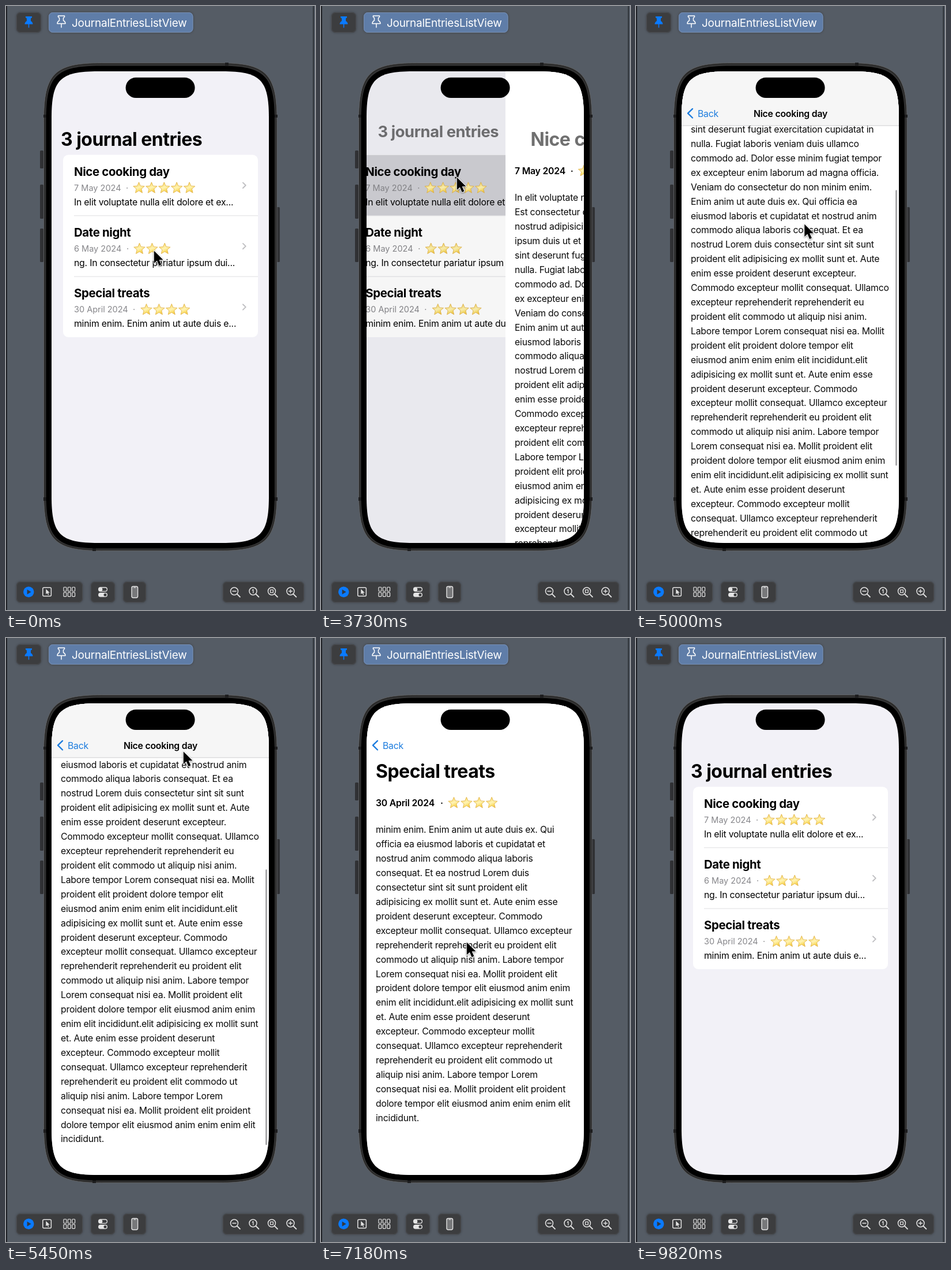
Write an HTML page with a canvas that moves like this. It is 536 px wide and 1045 px high and loops after 9910 ms.

```html
<!DOCTYPE html>
<html lang="en">
<head>
<meta charset="utf-8">
<title>Journal preview</title>
<style>
html, body { margin: 0; width: 100%; height: 100%; overflow: hidden; background: #555c65; }
canvas { display: block; width: 536px; height: 1045px; }
</style>
</head>
<body>
<canvas id="stage"></canvas>
<script>
const W = 536, H = 1045, LOOP = 9910, FPS = 11;
const canvas = document.getElementById('stage');
const ctx = canvas.getContext('2d');
const dpr = window.devicePixelRatio || 1;
canvas.width = W * dpr;
canvas.height = H * dpr;

// weight, size, tracking
const BODY = [400, 15.8, -0.22], BOLD = [600, 15.8, -0.22], SMALL = [400, 14.5, 0];
const LARGE = [700, 32, -0.52], HEAD = [700, 20.4, -0.36], BAR = [400, 19, -0.24];
const SCREEN = { x: 79, y: 113, w: 377, h: 816 };
const BAR_END = 207, LINE = 24.92, MAX_SCROLL = 362;
const BLUE = '#1c7cde';

const longText = [
  'In elit voluptate nulla elit dolore et exercitation.',
  'Est consectetur do tempor sunt veniam',
  'nostrud adipisicing. In consectetur pariatur',
  'ipsum duis ut et pariatur. Fugiat incididunt et',
  'sint deserunt fugiat exercitation cupidatat in',
  'nulla. Fugiat laboris veniam duis ullamco',
  'commodo ad. Dolor esse minim fugiat tempor',
  'ex excepteur enim laborum ad magna officia.',
  'Veniam do consectetur do non minim enim.',
  'Enim anim ut aute duis ex. Qui officia ea',
  'eiusmod laboris et cupidatat et nostrud anim',
  'commodo aliqua laboris consequat. Et ea',
  'nostrud Lorem duis consectetur sint sit sunt',
  'proident elit adipisicing ex mollit sunt et. Aute',
  'enim esse proident deserunt excepteur.',
  'Commodo excepteur mollit consequat. Ullamco',
  'excepteur reprehenderit reprehenderit eu',
  'proident elit commodo ut aliquip nisi anim.',
  'Labore tempor Lorem consequat nisi ea. Mollit',
  'proident elit proident dolore tempor elit',
  'eiusmod anim enim enim elit incididunt.elit',
  'adipisicing ex mollit sunt et. Aute enim esse',
  'proident deserunt excepteur. Commodo',
  'excepteur mollit consequat. Ullamco excepteur',
  'reprehenderit reprehenderit eu proident elit',
  'commodo ut aliquip nisi anim. Labore tempor',
  'Lorem consequat nisi ea. Mollit proident elit',
  'proident dolore tempor elit eiusmod anim enim',
  'enim elit incididunt.elit adipisicing ex mollit sunt',
  'et. Aute enim esse proident deserunt',
  'excepteur. Commodo excepteur mollit',
  'consequat. Ullamco excepteur reprehenderit',
  'reprehenderit eu proident elit commodo ut',
  'aliquip nisi anim. Labore tempor Lorem',
  'consequat nisi ea. Mollit proident elit proident',
  'dolore tempor elit eiusmod anim enim enim elit',
  'incididunt.'
];
const entries = [
  { title: 'Nice cooking day', date: '7 May 2024', stars: 5, left: 95,
    rowDot: 210, rowStar: 230.5, dot: 194, star: 215,
    teaser: 'In elit voluptate nulla elit dolore et ex...', lines: longText },
  { title: 'Date night', date: '6 May 2024', stars: 3, left: 100,
    rowDot: 211, rowStar: 231.5, dot: 200, star: 221,
    teaser: 'ng. In consectetur pariatur ipsum dui...',
    lines: [
      'ng. In consectetur pariatur ipsum duis ut et pt',
      'elit commodo ut aliquip nisi anim. Labore',
      'tempor Lorem consequat nisi ea. Mollit',
      'proident elit proident dolore tempor elit',
      'eiusmod anim enim enim elit incididunt.'
    ] },
  { title: 'Special treats', date: '30 April 2024', stars: 4, left: 95,
    rowDot: 222, rowStar: 243.5, dot: 209.5, star: 230.5,
    teaser: 'minim enim. Enim anim ut aute duis e...',
    lines: [
      'minim enim. Enim anim ut aute duis ex. Qui',
      'officia ea eiusmod laboris et cupidatat et',
      'nostrud anim commodo aliqua laboris',
      'consequat. Et ea nostrud Lorem duis',
      'consectetur sint sit sunt proident elit',
      ...longText.slice(21)
    ] }
];

// Which entry opens and closes when
const visits = [
  { entry: 1, open: 1660, close: 2690 },
  { entry: 0, open: 3660, close: 5930 },
  { entry: 2, open: 6660, close: 7760 }
];
// time, x, y of the pointer tip
const pointer = [
  [0, 256, 422], [90, 256, 422], [180, 153, 290], [640, 153, 290], [1090, 318, 422],
  [1760, 318, 422], [2090, 322, 403], [2200, 322, 403], [2560, 112, 172], [2960, 112, 172],
  [3480, 235, 295], [3880, 235, 295], [4260, 276, 601], [4450, 276, 600], [4640, 276, 557],
  [5360, 307, 195], [5540, 307, 195], [5850, 112, 182], [6100, 112, 182], [6500, 252, 525],
  [7270, 252, 525], [7630, 123, 186], [8910, 123, 186], [9270, 43, 230]
];

const clamp = (v, a = 0, b = 1) => Math.min(b, Math.max(a, v));
const mix = (a, b, u) => a + (b - a) * u;

function spring(ms) {
  const k = Math.max(0, ms) * 0.0188;
  const p = 1 - (1 + k) * Math.exp(-k);
  return p > 0.992 ? 1 : p;
}

function pointerAt(t) {
  const i = pointer.findIndex(k => k[0] > t);
  if (i < 0) return null;
  const [t0, x0, y0] = pointer[i - 1], [t1, x1, y1] = pointer[i];
  let u = (t - t0) / (t1 - t0);
  u = u * u * (3 - 2 * u);
  return { x: mix(x0, x1, u), y: mix(y0, y1, u) };
}

function text(str, x, y, [weight, size, track], color, align = 'left') {
  ctx.font = `${weight} ${size}px Inter, "Liberation Sans", sans-serif`;
  ctx.letterSpacing = track + 'px';
  ctx.textAlign = align;
  ctx.fillStyle = color;
  ctx.fillText(str, x, y);
}

function rect(x, y, w, h, color) {
  ctx.fillStyle = color;
  ctx.fillRect(x, y, w, h);
}

function paint(shape, fill, stroke, width = 1) {
  if (fill) { ctx.fillStyle = fill; ctx.fill(shape); }
  if (stroke) { ctx.strokeStyle = stroke; ctx.lineWidth = width; ctx.stroke(shape); }
}

function rounded(x, y, w, h, r) {
  const shape = new Path2D();
  shape.roundRect(x, y, w, h, r);
  return shape;
}

// Rounded rectangle whose corners ease into the straight sides
function smooth(x, y, w, h, r) {
  const shape = new Path2D(), e = r * 1.528, c = r * 0.272, X = x + w, Y = y + h;
  shape.moveTo(x + e, y);
  shape.lineTo(X - e, y);
  shape.bezierCurveTo(X - c, y, X, y + c, X, y + e);
  shape.lineTo(X, Y - e);
  shape.bezierCurveTo(X, Y - c, X - c, Y, X - e, Y);
  shape.lineTo(x + e, Y);
  shape.bezierCurveTo(x + c, Y, x, Y - c, x, Y - e);
  shape.lineTo(x, y + e);
  shape.bezierCurveTo(x, y + c, x + c, y, x + e, y);
  shape.closePath();
  return shape;
}

function round(x, y, w, h, r, ...style) {
  paint(rounded(x, y, w, h, r), ...style);
}

function circle(x, y, r, ...style) {
  round(x - r, y - r, 2 * r, 2 * r, r, ...style);
}

function path(d, x, y, ...style) {
  at(x, y, () => {
    ctx.lineCap = ctx.lineJoin = 'round';
    paint(new Path2D(d), ...style);
  });
}

function at(x, y, draw) {
  ctx.save();
  ctx.translate(x, y);
  draw();
  ctx.restore();
}

function faded(alpha, draw) {
  if (alpha <= 0) return;
  ctx.save();
  ctx.globalAlpha = clamp(alpha);
  draw();
  ctx.restore();
}

function clipped(shape, draw) {
  ctx.save();
  ctx.clip(shape);
  draw();
  ctx.restore();
}

function stars(n, x, y) {
  for (let s = 0; s < n; s++) at(x + s * 21.9, y, () => {
    const g = ctx.createLinearGradient(-4, -10, 4, 9);
    g.addColorStop(0, '#f8d65a');
    g.addColorStop(0.5, '#fff3b4');
    g.addColorStop(0.75, '#fbde68');
    g.addColorStop(1, '#f0bc3a');
    ctx.beginPath();
    for (let i = 0; i < 10; i++) {
      const r = i % 2 ? 4.6 : 10.2, a = i * Math.PI / 5 - Math.PI / 2;
      ctx.lineTo(r * Math.cos(a), r * Math.sin(a) + 0.5);
    }
    ctx.closePath();
    ctx.lineJoin = 'round';
    ctx.fillStyle = g;
    ctx.fill();
    ctx.strokeStyle = '#e2b54c';
    ctx.lineWidth = 0.9;
    ctx.stroke();
  });
}

function listPage(selected, glow) {
  rect(-60, 113, 640, 816, '#f2f1f7');
  clipped(rounded(99, 257.5, 338, 315.5, 9), () => {
    rect(99, 257, 338, 317, '#fff');
    entries.forEach((e, i) => {
      const y = i * 105.3;
      if (i === selected) faded(glow, () => rect(99, 257.5 + y, 338, 105, '#d0d0d5'));
      if (i) rect(118, 257 + y, 319, 1, '#dedee1');
      text(e.title, 118, 293.5 + y, HEAD, '#000');
      text(e.date, 118, 319.5 + y, SMALL, '#86868a');
      text('·', e.rowDot, 319.5 + y, SMALL, '#86868a', 'center');
      stars(e.stars, e.rowStar, 314.5 + y);
      text(e.teaser, 118, 344.8 + y, BODY, '#000');
      path('M0-4.7L4.8 0L0 4.7', 411, 310.3 + y, null, '#bfbfc2', 1.9);
    });
  });
}

function detailPage(e, scroll) {
  rect(79, 113, 377, 816, '#fff');
  at(0, -scroll, () => {
    text(e.date, e.left, 290.5, BOLD, '#000');
    text('·', e.dot, 290.5, BOLD, '#000', 'center');
    stars(e.stars, e.star, 285);
    e.lines.forEach((line, i) => text(line, e.left, 337.3 + i * LINE, BODY, '#0a0a0a'));
  });
  rect(79, 113, 377, BAR_END - 113, '#fff');
}

function detailBar(e, scroll, p) {
  clipped(rounded(79, BAR_END, 377, 100, 0), () => faded(p * 1.55, () =>
    text(e.title, 95 + (1 - p) * 420, 242 - scroll, LARGE, '#000')));
  if (scroll > 45) faded(p, () => {
    rect(79, 113, 377, BAR_END - 113, '#f6f6f6');
    rect(79, BAR_END - 0.5, 377, 1, '#cfcfd1');
    text(e.title, 268 + (1 - p) * 190, 191.5, BOLD, '#000', 'center');
  });
  faded(p * 2 - 1, () => {
    path('M8-7.8L0 0L8 7.8', 90, 185.7, null, BLUE, 2.4);
    text('Back', 107 + (1 - p) * 60, 191.5, BODY, BLUE);
  });
}

function listTitle(p) {
  const q = p * 0.8;
  faded(1 - 1.28 * p, () => at(mix(95, 107, q), mix(231, 186, q), () => {
    ctx.scale(1 - q / 2, 1 - q / 2);
    text('3 journal entries', 0, 11, LARGE, '#000');
  }));
}

function scrollAt(t, visit) {
  if (visit.entry !== 0 || t < 4450) return 0;
  return t > 5360 ? MAX_SCROLL : clamp(594 - pointerAt(t).y, 0, MAX_SCROLL);
}

function screen(t) {
  const visit = visits.find(v => t >= v.open && t < v.close + 700);
  if (!visit) {
    listPage(-1, 0);
    listTitle(0);
    return;
  }
  const closing = t >= visit.close;
  const p = closing ? 1 - spring(t - visit.close) : spring(t - visit.open);
  const e = entries[visit.entry], scroll = scrollAt(t, visit);
  at(-113 * p, 0, () => listPage(visit.entry, closing ? p : 1));
  faded(0.1 * p, () => rect(79, 113, 377, 816, '#000'));
  if (p > 0) at(377 * (1 - p), 0, () => detailPage(e, scroll));
  listTitle(p);
  detailBar(e, scroll, p);
  if (scroll > 0) {
    const show = Math.min((t - 4450) / 120, (5930 - t) / 250);
    faded(show, () => round(450, 215 + (scroll - 37) * 0.57, 3, 477, 1.5, '#aaaaac'));
  }
}

function phone(t) {
  const key = '#303134';
  round(59, 250, 6, 31, 1.5, key);
  round(59, 309, 6, 59, 1.5, key);
  round(59, 385, 6, 58, 1.5, key);
  round(469, 348, 6, 95, 1.5, key);
  paint(smooth(65.5, 98.5, 404.5, 844, 66), '#343434', '#5e5f61', 1);
  paint(smooth(67, 100, 401.5, 841, 64.5), null, '#232323', 1.2);
  for (const [x, y, w, h] of [[380, 98, 6, 5], [150, 938, 6, 5], [65, 188, 5, 5],
    [466, 188, 5, 5], [65, 850, 5, 6], [466, 850, 5, 6]]) rect(x, y, w, h, '#1d1d1e');
  paint(smooth(69.5, 103.5, 396.5, 835, 62), '#000');
  clipped(smooth(SCREEN.x, SCREEN.y, SCREEN.w, SCREEN.h, 53), () => screen(t));
  round(207.6, 123.8, 120, 35.2, 17.6, '#000');
}

function panel(x, y, w, h, fill = '#3c3d3f', edge = '#4a4b4e') {
  ctx.save();
  ctx.shadowColor = 'rgba(0,0,0,.3)';
  ctx.shadowBlur = 4 * dpr;
  round(x, y, w, h, 7, fill);
  ctx.restore();
  round(x + 0.5, y + 0.5, w - 1, h - 1, 7, null, edge);
}

const PIN = 'M-5.5-10h11v2l-2 1.5v4.5q3.5 2 3.5 5.5h-14q0-3.5 3.5-5.5v-4.5l-2-1.5z';

function magnifier(x, inner) {
  const ink = '#e4e4e4';
  circle(x - 1.5, 1012.5, 6.5, null, ink, 1.5);
  path('M0 0L5 5', x + 3.4, 1017.4, null, ink, 2);
  path(inner, x - 1.5, 1012.5, null, ink, 1.3);
}

function chrome() {
  const ink = '#e4e4e4';
  rect(0, 0, W, H, '#555c65');
  rect(0, 0, 2, H, '#202227');
  rect(532.5, 0, 1.5, H, '#25282d');

  panel(18, 11, 43, 35);
  path(PIN, 39.5, 28, '#0a7aff');
  path('M0 3v6', 39.5, 28, null, '#0a7aff', 1.6);
  panel(74, 11, 250.5, 35, '#5f7da8', '#7890b4');
  path(PIN + 'M0 4v6', 96, 27, null, '#fff', 1.5);
  text('JournalEntriesListView', 114, 36, BAR, '#fff');

  panel(18, 996, 115, 36);
  panel(147, 996, 42, 36);
  panel(203, 996, 40, 36);
  panel(376, 996, 141, 36);

  circle(39.3, 1013.7, 9.2, '#0a7aff');
  path('M-2.7-4.2L4.3 0L-2.7 4.2z', 39.3, 1013.7, '#33383f');
  round(63.8, 1006.3, 14.6, 14.6, 2, null, ink, 1.5);
  path('M0 0v9l2.2-2l1.6 3.3l1.3-.6l-1.5-3.2h3z', 69.3, 1008.7, ink);
  for (let i = 0; i < 6; i++)
    round(100 + (i % 3) * 7.4, 1005.5 + (i > 2 ? 9.2 : 0), 4.8, 7, 1, null, ink, 1.2);

  round(160.6, 1006, 14.8, 6.6, 3.3, null, ink, 1.3);
  circle(164, 1009.3, 3.3, ink);
  round(160, 1015, 16, 7.6, 3.8, ink);
  circle(172, 1018.8, 2.5, '#3c3d3f');

  round(218, 1004.3, 10.6, 19.4, 2.4, '#77787a', ink, 1.4);
  rect(221.5, 1005.5, 3.6, 1.2, ink);

  magnifier(397.5, 'M-3 0h6');
  magnifier(430, 'M-1.2-1.8L.3-3v6');
  magnifier(462.5, 'M-2.4-2.4h4.8v4.8h-4.8z');
  magnifier(495, 'M-3 0h6M0-3v6');
}

function arrow({ x, y }) {
  const d = 'M.8 1.4V23.2L5.9 18.6L9.6 27.2L13.4 25.6L9.7 17.2H16.6Z';
  ctx.save();
  ctx.shadowColor = 'rgba(0,0,0,.35)';
  ctx.shadowBlur = 3 * dpr;
  ctx.shadowOffsetY = dpr;
  path(d, x, y, '#fff', '#fff', 2);
  ctx.restore();
  path(d, x, y, '#000');
}

function draw(now) {
  const t = Math.floor(((now % LOOP) + 5) * FPS / 1000) * 1000 / FPS;
  ctx.setTransform(dpr, 0, 0, dpr, 0, 0);
  chrome();
  phone(t);
  const tip = pointerAt(t);
  if (tip) arrow(tip);
}

const start = performance.now();
function tick() {
  draw(performance.now() - start);
  requestAnimationFrame(tick);
}
tick();
</script>
</body>
</html>
```
